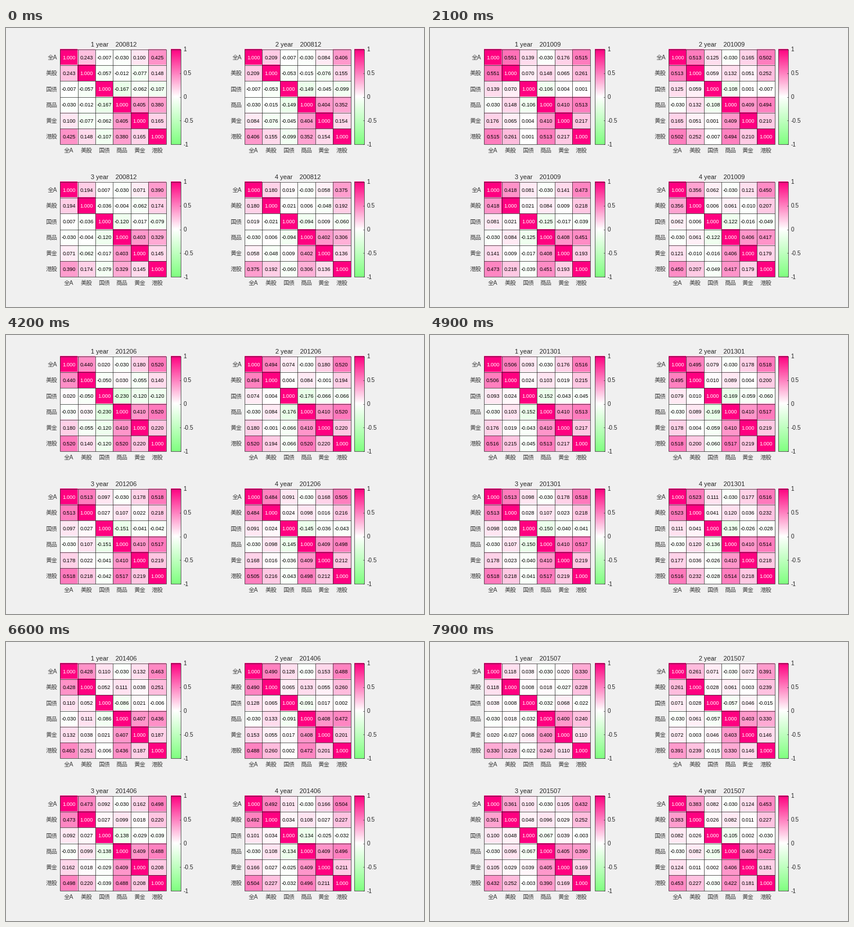
Write a matplotlib script that moves like this. It is 720x480 px and loops after 8 s.

```python
import matplotlib.pyplot as plt
import numpy as np
from matplotlib.animation import FuncAnimation
from matplotlib.colors import LinearSegmentedColormap

W, H, DPI = 720, 480, 100
FRAMES, INTERVAL = 80, 100
NAMES = ["全A", "美股", "国债", "商品", "黄金", "港股"]
N = len(NAMES)
INK, SOFT = "#262626", "#404040"
CMAP = LinearSegmentedColormap.from_list(
    "corr", ["#80ff80", "#ffffff", "#ff0080"], N=256)

plt.rcParams["font.family"] = ["Liberation Sans", "Noto Sans CJK JP"]

# Two market moods over months since 2008-12. Stress lifts each pair by its
# own gain; the swing moves every pair that holds US stocks or bonds.
MONTHS = [-36, -24, -12, 0, 12, 30, 42, 57, 66, 79]
STRESS = [0, 0.15, 0.3, 0.5, 0.95, 1, 1, 0.95, 0.7, 0]
SWING = [0.4, 0, -0.6, -0.8, 0.5, 0.2, -1, 0.8, 0.3, 0.2]
SWING_SIZE = 0.09

PAIRS = list(zip(*np.triu_indices(N, 1)))
BASE = np.array([0.10, 0.02, -0.03, 0.02, 0.33,
                 -0.01, 0.00, -0.045, 0.21,
                 -0.05, 0.05, -0.04,
                 0.40, 0.24,
                 0.11])
GAIN = np.array([0.43, 0.09, 0.00, 0.16, 0.19,
                 0.05, 0.12, 0.08, 0.02,
                 -0.09, -0.08, 0.01,
                 0.01, 0.28,
                 0.11])
SWINGS = np.array([bool({1, 2} & set(pair)) for pair in PAIRS])


def correlation(month, years):
    """Matrix for a trailing window, as the mean of its single years."""
    past = month - 12 * np.arange(years)
    stress = np.interp(past, MONTHS, STRESS).mean()
    swing = np.interp(past, MONTHS, SWING).mean()
    corr = np.eye(N)
    upper = BASE + GAIN * stress + SWING_SIZE * swing * SWINGS
    for (r, c), value in zip(PAIRS, upper):
        corr[r, c] = corr[c, r] = value
    return corr


fig = plt.figure(figsize=(W / DPI, H / DPI), dpi=DPI, facecolor="#f0f0f0")
ax = fig.add_axes([0, 0, 1, 1])
ax.axis("off")


def pt(px):
    return px * 72 / DPI


def label(x, y, text, size, color=INK, ha="center"):
    """Text with its digits centred vertically on y."""
    return ax.text(x, y + 0.36 * size, text, fontsize=pt(size), color=color,
                   ha=ha, va="baseline")


def image(data, x0, x1, y0, y1):
    return ax.imshow(data, cmap=CMAP, vmin=-1, vmax=1, aspect="auto",
                     interpolation="nearest", extent=(x0, x1, y1, y0))


def line(xs, ys, width=0.7):
    ax.plot(xs, ys, color=INK, lw=pt(width), solid_capstyle="butt")


class Panel:
    w, h = 182.5, 163.3

    def __init__(self, x, y, bar_x, years):
        self.years = years
        self.title = label(x + self.w / 2 + 0.8, y - 8.6, "", 11)
        self.cells = image(np.eye(N), x, x + self.w, y, y + self.h)
        cw, ch = self.w / N, self.h / N
        for i in range(N + 1):
            line([x + i * cw] * 2, [y, y + self.h])
            line([x, x + self.w], [y + i * ch] * 2)
        for i, name in enumerate(NAMES):
            mid = i + 0.5
            label(x - 4.6, y + mid * ch, name, 10, SOFT, "right")
            label(x + mid * cw, y + self.h + 10, name, 10, SOFT)
        self.texts = [[label(x + (c + 0.5) * cw, y + (r + 0.5) * ch, "", 9,
                             "white" if r == c else "black")
                       for c in range(N)] for r in range(N)]
        self.colorbar(bar_x, y)

    def colorbar(self, x, y, w=16.6):
        image(np.linspace(1, -1, 256)[:, None], x, x + w, y, y + self.h)
        line([x, x + w, x + w, x, x], [y, y, y + self.h, y + self.h, y])
        for i, text in enumerate(["1", "0.5", "0", "-0.5", "-1"]):
            ty = y + self.h * i / 4
            line([x + w - 2, x + w], [ty, ty])
            label(x + w + 4.6, ty, text, 10, ha="left")

    def show(self, month):
        corr = correlation(month, self.years)
        self.cells.set_data(corr)
        for r in range(N):
            for c in range(N):
                self.texts[r][c].set_text(f"{corr[r, c]:.3f}")
        year, index = divmod(2008 * 12 + 11 + month, 12)
        self.title.set_text(f"{self.years} year    {year}{index + 1:02d}")


CORNERS = [(x, y, bar) for y in (36.9, 264.9)
           for x, bar in ((93.2, 284), (411, 600.3))]
panels = [Panel(*corner, k + 1) for k, corner in enumerate(CORNERS)]
ax.set_xlim(0, W)
ax.set_ylim(H, 0)


def update(month):
    for panel in panels:
        panel.show(month)
    return []


anim = FuncAnimation(fig, update, frames=FRAMES, interval=INTERVAL,
                     repeat=True, repeat_delay=0)
plt.show()
```
